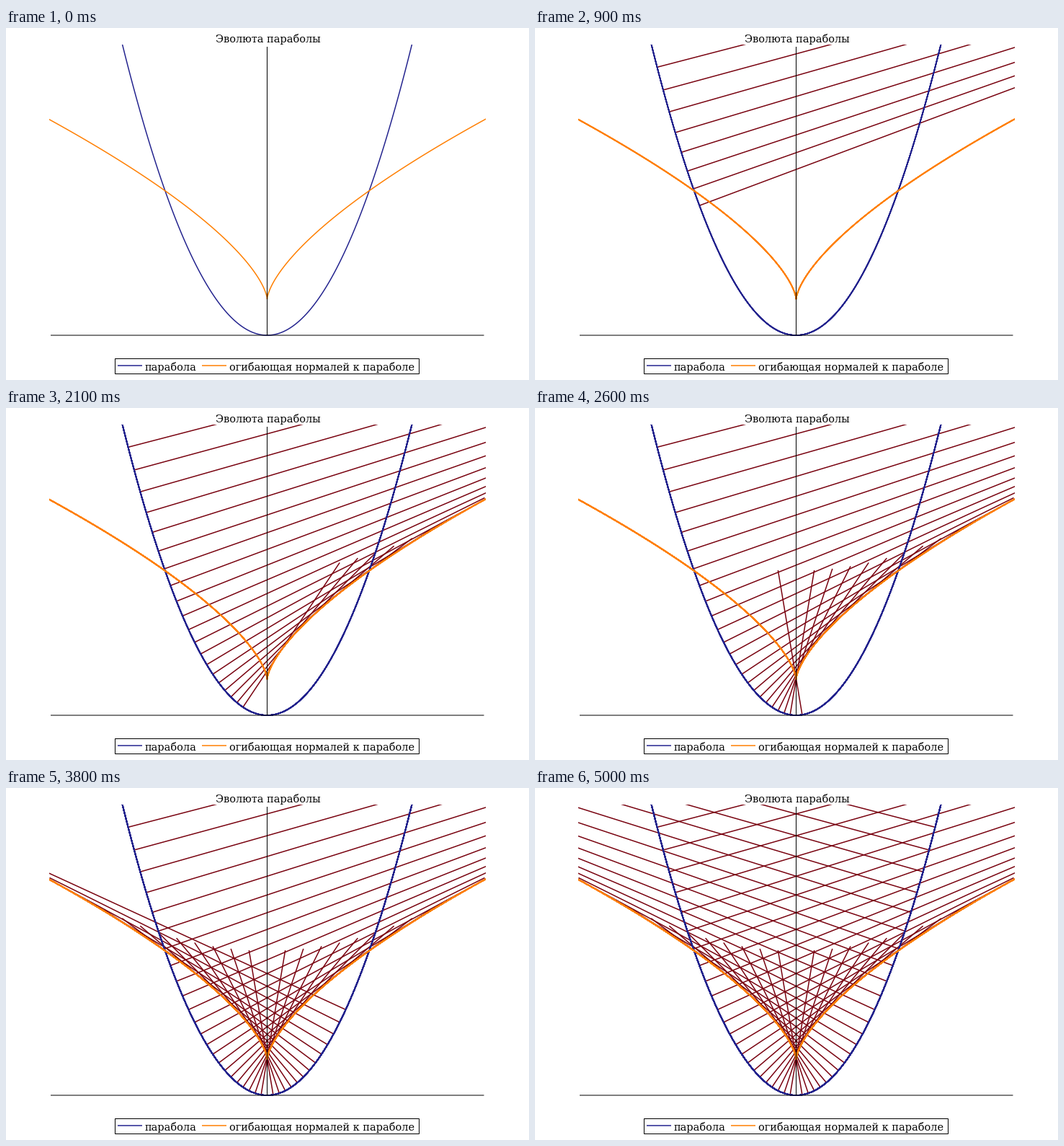
A matplotlib script that plays this animation: 726 by 488 pixels, repeating every 5.1 s.

```python
import numpy as np
import matplotlib.pyplot as plt
from matplotlib.animation import FuncAnimation
from matplotlib.collections import LineCollection
from matplotlib.patches import Rectangle

W, H, DPI = 726, 488, 64
PX = 72 / DPI                    # one pixel in points
FRAMES, INTERVAL = 51, 100
X0, Y0, UNIT = 362.5, 426.0, 100.17
STEP = 2.01 / 24                 # spacing of the feet of the normals
NAVY, CORAL, BURGUNDY = "#23238e", "#ff7f00", "#78000e"

fig = plt.figure(figsize=(W / DPI, H / DPI), dpi=DPI, facecolor="white")
ax = fig.add_axes([0, 0, 1, 1])
ax.set_xlim(0, W)
ax.set_ylim(H, 0)
ax.axis("off")


def to_px(x, y):
    return np.column_stack([X0 + UNIT * np.asarray(x), Y0 - UNIT * np.asarray(y)])


def line(x, y, color="black", width=1.0, zorder=5):
    ax.plot(x, y, color=color, lw=width * PX, solid_capstyle="butt",
            snap=False, zorder=zorder)


def label(x, y, text, ha="left"):
    ax.text(x, y, text, family="DejaVu Serif", size=14.5 * PX,
            ha=ha, va="baseline", color="black")


def clipped(color, zorder):
    lines = LineCollection([], colors=color, linewidths=1.5 * PX, zorder=zorder)
    ax.add_collection(lines, autolim=False)
    lines.set_clip_path(Rectangle((60, 23), 606, 404, transform=ax.transData))
    return lines


def normal(a):
    """Normal of y = x^2 at x = a, drawn as far as x = -3a."""
    return to_px([a, -3 * a], [a * a, a * a + 2])


s = np.linspace(-2.02, 2.02, 241)
t = np.linspace(-0.95, 0.95, 241)
parabola = to_px(s, s**2)
evolute = to_px(-4 * t**3, 0.5 + 3 * t**2)

normals = clipped(BURGUNDY, 2)
parabolas = clipped(NAVY, 3)
evolutes = clipped(CORAL, 4)

# Axes
line([62, 663.5], [426, 426])
line([362.5, 362.5], [26, 426])

# Title and legend
label(363.5, 20, "Эволюта параболы", ha="center")
ax.add_patch(Rectangle((151.5, 458.5), 422, 21, fill=False, ec="black",
                       lw=PX, snap=False))
line([155, 189], [468, 468], NAVY, 1.5)
label(193, 475, "парабола")
line([272, 306], [468, 468], CORAL, 1.5)
label(309.5, 475, "огибающая нормалей к параболе")


def update(i):
    feet = [(k - 25) * STEP for k in range(1, i + 1) if k != 25]
    normals.set_segments([normal(a) for a in feet])
    # Every step paints the curves once more, so their soft edges fill in
    parabolas.set_segments([parabola] * (i + 1))
    evolutes.set_segments([evolute] * (i + 1))
    return normals, parabolas, evolutes


anim = FuncAnimation(fig, update, frames=FRAMES, interval=INTERVAL,
                     repeat=True, repeat_delay=0, blit=False)
plt.show()
```
